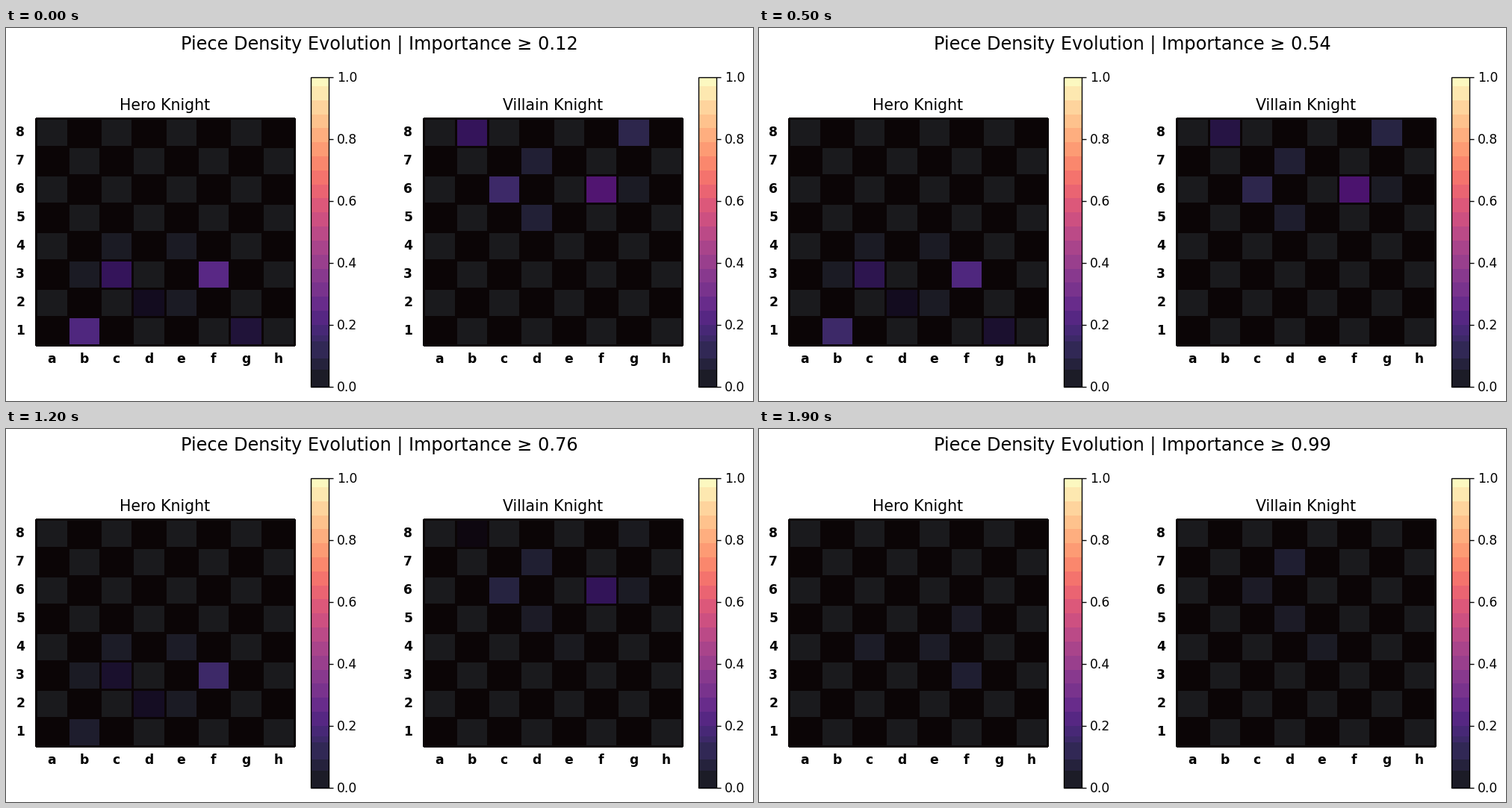
Animation of 1000x500 px, one loop 2 s. Source, as a matplotlib script:

```python
import numpy as np
import matplotlib.pyplot as plt
from matplotlib.animation import FuncAnimation
from matplotlib.patches import Rectangle

W, H, DPI = 1000, 500, 100
FRAMES, INTERVAL = 20, 100
PX = 72 / DPI                      # points per pixel
TICK, HEAD, TITLE = 17.14 * PX, 20.57 * PX, 24 * PX
LEFT, TOP, BOTTOM = 39.6, 120.6, 424.8
CELL_W, CELL_H = 43.28, (BOTTOM - TOP) / 8
BAR_TOP, BAR_BOTTOM = 65.6, 480.6
ALPHA = 0.9
MAGMA = plt.get_cmap("magma")
LIGHT, DARK = np.ones(3), np.array([110, 50, 25]) / 255

THRESHOLDS = [0.12, 0.28, 0.38, 0.46, 0.5, 0.54, 0.58, 0.61, 0.64, 0.67,
              0.7, 0.73, 0.76, 0.79, 0.82, 0.86, 0.89, 0.92, 0.95, 0.99]

# Density of each occupied square (percent) at the key steps
STEPS = [0, 3, 7, 10, 14, 17, 19]
HERO = {
    "c4": [2, 2, 2.5, 2.5, 3, 2.5, 3],
    "e4": [2, 2, 2.5, 2.5, 3, 2.5, 3],
    "b3": [2, 2, 2, 2, 2.5, 2, 0],
    "c3": [17, 15.5, 14.5, 11.5, 6, 0, 0],
    "f3": [23, 20, 20, 19.5, 11, 10.5, 5],
    "d2": [6, 6, 6, 6, 7.5, 0, 0],
    "e2": [2, 2, 2, 2, 2.5, 0, 0],
    "b1": [20, 20, 11, 6, 2.5, 2.5, 0],
    "g1": [11, 11, 7, 0, 0, 0, 0],
    "f5": [0, 0, 0, 0, 0, 0, 2.5],
}
VILLAIN = {
    "b8": [17, 15, 11, 6, 0, 0, 0],
    "g8": [10.5, 10.5, 6, 2, 0, 0, 0],
    "d7": [5.5, 5.5, 5.5, 5.5, 5, 2.5, 5],
    "c6": [15.5, 10.5, 10.5, 10.5, 5.5, 4.5, 2.5],
    "f6": [24.5, 23.5, 22, 18.5, 14.5, 6, 0],
    "g6": [2, 2, 2, 2, 2.5, 0, 0],
    "d5": [6, 6, 2.5, 2.5, 2.5, 2.5, 2.5],
    "e4": [0, 0, 0, 0, 2, 2, 2],
}


def blend(values, under):
    """Colour map laid over a background with fixed opacity."""
    return ALPHA * np.array(MAGMA(values))[..., :3] + (1 - ALPHA) * under


rows, cols = np.indices((8, 8))
CHECKER = np.where(((rows + cols) % 2 == 0)[..., None], LIGHT, DARK)


def board(density, i):
    grid = np.zeros((8, 8))
    for square, levels in density.items():
        row, col = 8 - int(square[1]), "abcdefgh".index(square[0])
        grid[row, col] = np.interp(i, STEPS, levels) / 100
    return blend(grid, CHECKER)


plt.rcParams["font.family"] = "DejaVu Sans"
fig = plt.figure(figsize=(W / DPI, H / DPI), dpi=DPI, facecolor="white")
ax = fig.add_axes([0, 0, 1, 1])
ax.axis("off")


def label(x, y, text, size=TICK, ha="center", weight="normal"):
    return ax.text(x, y, text, fontsize=size, ha=ha, va="baseline",
                   color="black", fontweight=weight)


def colorbar(x):
    width = 23.5
    edges = np.r_[0, 0.055, 0.09, 0.145, 0.165, 0.2,
                  np.linspace(0.245, 0.97, 17), 1]
    span = BAR_BOTTOM - BAR_TOP
    for low, high in zip(edges[:-1], edges[1:]):
        ax.add_patch(Rectangle((x, BAR_BOTTOM - high * span), width,
                               (high - low) * span, lw=0, antialiased=False,
                               facecolor=blend((low + high) / 2, LIGHT)))
    ax.add_patch(Rectangle((x, BAR_TOP), width, span, fill=False,
                           edgecolor="black", lw=1.37 * PX))
    for value in np.linspace(0, 1, 6):
        y = BAR_BOTTOM - value * span
        ax.plot([x + width, x + width + 6], [y, y], color="black",
                lw=1.37 * PX, solid_capstyle="butt")
        label(x + width + 11.5, y + 6.2, f"{value:.1f}", ha="left")


def panel(dx, name, density):
    x = dx + LEFT + CELL_W * np.arange(9)
    y = TOP + CELL_H * np.arange(9)
    mesh = ax.pcolormesh(x, y, board(density, 0), edgecolors="#0b0506",
                         linewidth=1.1 * PX)
    label(dx + 212.7, 110.5, name, HEAD)
    for k in range(8):
        label(x[k] + CELL_W / 2, 449, "abcdefgh"[k], weight="bold")
        label(dx + 19.3, y[k] + CELL_H / 2 + 5.2, str(8 - k), weight="bold")
    colorbar(dx + 408)
    return mesh


PANELS = [(panel(0, "Hero Knight", HERO), HERO),
          (panel(519, "Villain Knight", VILLAIN), VILLAIN)]
title = label(500, 29, "", TITLE)
ax.set_xlim(0, W)
ax.set_ylim(H, 0)


def update(i):
    title.set_text(f"Piece Density Evolution | Importance ≥ {THRESHOLDS[i]}")
    for mesh, density in PANELS:
        mesh.set_array(board(density, i))
    return [title] + [mesh for mesh, _ in PANELS]


anim = FuncAnimation(fig, update, frames=FRAMES, interval=INTERVAL,
                     repeat=True, repeat_delay=0, blit=False)
plt.show()
```
